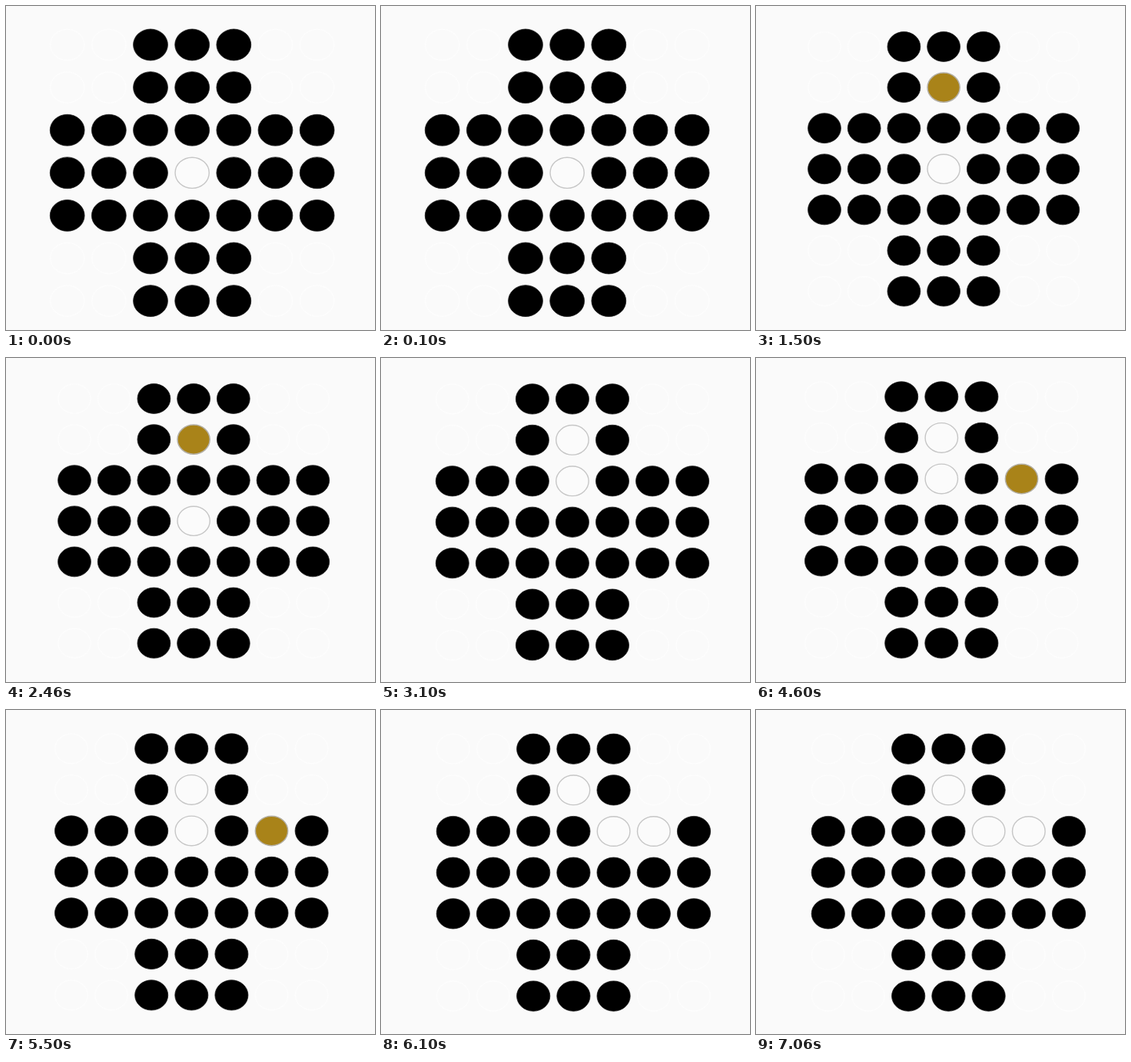
Recreate the animation shown at these times as an HTML page. Size 480 by 422 pixels, loop 7.7 s.

```html
<!DOCTYPE html>
<html>
<head>
<meta charset="utf-8">
<title>Peg solitaire</title>
<style>
html, body { margin: 0; width: 100%; height: 100%; overflow: hidden; background: #fafafa; }
svg { display: block; width: 100%; height: 100%; }
</style>
</head>
<body>
<svg id="board" viewBox="0 0 480 422"></svg>
<script>
const NS = "http://www.w3.org/2000/svg";
const SIZE = 7, LOOP = 7700;

// Each view: start time, centre of the first hole, pitch, radii, empty holes and chosen peg (row, column).
const views = [
  { at: 0,    x: 79.7, y: 50.5, dx: 54.15, dy: 55.6,  rx: 22.8, ry: 20.8, empty: ["33"] },
  { at: 1500, x: 89,   y: 53,   dx: 51.7,  dy: 53.1,  rx: 21.8, ry: 19.8, empty: ["33"], chosen: "13" },
  { at: 3100, x: 92.8, y: 53.4, dx: 52.05, dy: 53.45, rx: 21.9, ry: 20,   empty: ["13", "23"] },
  { at: 4600, x: 85,   y: 50.4, dx: 52.1,  dy: 53.5,  rx: 21.9, ry: 20,   empty: ["13", "23"], chosen: "25" },
  { at: 6100, x: 93.8, y: 50.7, dx: 52.2,  dy: 53.65, rx: 22,   ry: 20,   empty: ["13", "24", "25"] }
];

const styles = {
  peg:    { fill: "#000", stroke: "#1c1c1c", "stroke-width": 0.8 },
  chosen: { fill: "#a98319", stroke: "#b4b0a6", "stroke-width": 1.5 },
  empty:  { fill: "#fbfbfb", stroke: "#c6c6c6", "stroke-width": 1.4 },
  corner: { fill: "#fafafa", stroke: "#fdfdfd", "stroke-width": 1.4 }
};

const board = document.getElementById("board");
const holes = [];
for (let row = 0; row < SIZE; row++) {
  for (let col = 0; col < SIZE; col++) {
    const el = board.appendChild(document.createElementNS(NS, "ellipse"));
    holes.push({ row, col, el });
  }
}

function setAttrs(el, attrs) {
  for (const key in attrs) el.setAttribute(key, attrs[key]);
}

const outer = i => i < 2 || i > 4;

function kindOf(view, row, col) {
  const id = `${row}${col}`;
  if (outer(row) && outer(col)) return "corner";
  if (view.chosen === id) return "chosen";
  return view.empty.includes(id) ? "empty" : "peg";
}

let shown = null;

function draw(time) {
  const t = time % LOOP;
  const view = views.filter(v => v.at <= t).pop();
  if (view === shown) return;
  shown = view;
  for (const { row, col, el } of holes) {
    const style = styles[kindOf(view, row, col)];
    const inset = style["stroke-width"] / 2;
    setAttrs(el, {
      cx: view.x + col * view.dx,
      cy: view.y + row * view.dy,
      rx: view.rx - inset,
      ry: view.ry - inset,
      ...style
    });
  }
}

const start = performance.now();
function tick() {
  draw(performance.now() - start);
  requestAnimationFrame(tick);
}
tick();
</script>
</body>
</html>
```
